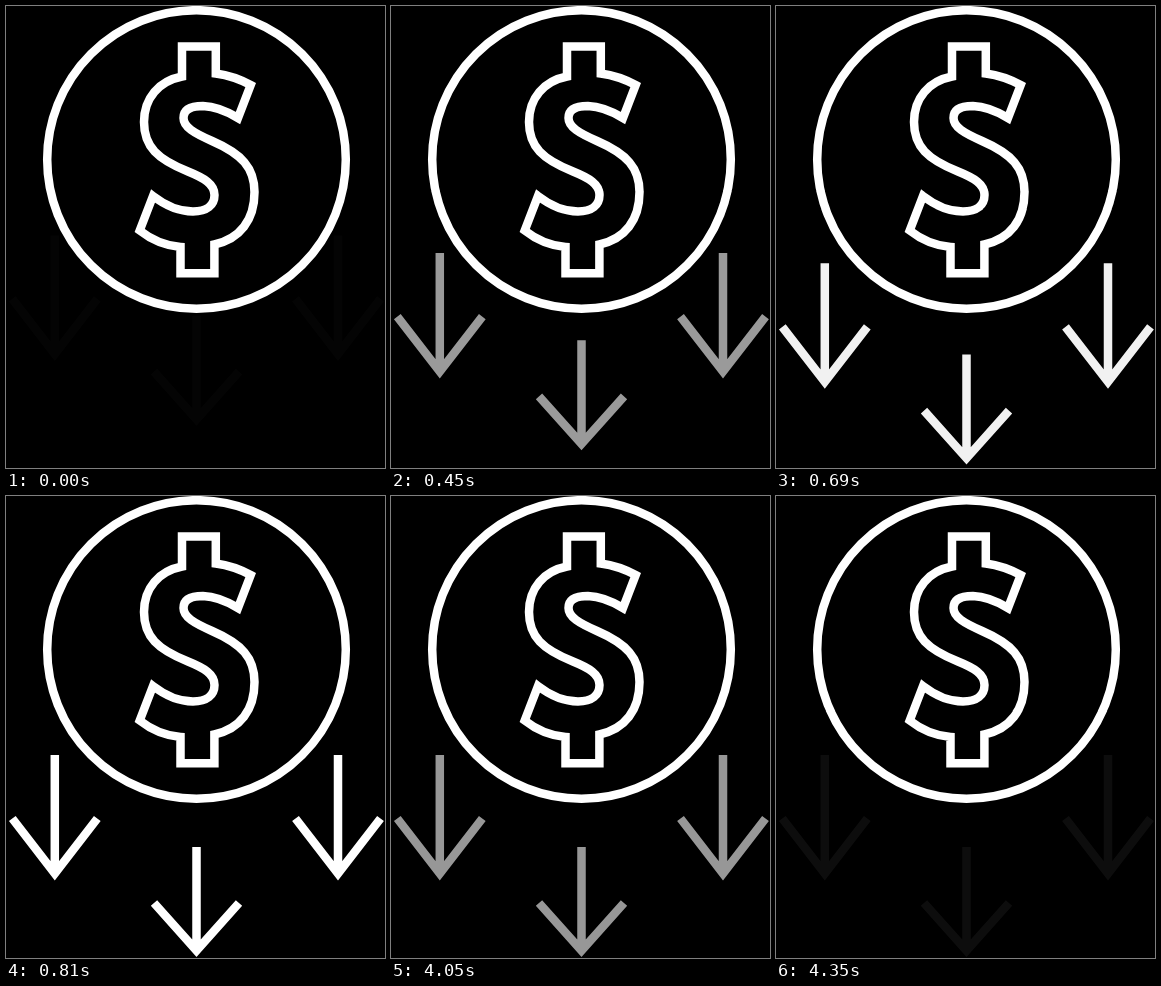
An HTML page that plays this animation: 379x462 px, repeating every 4.5 s.

```html
<!DOCTYPE html>
<html lang="en">
<head>
<meta charset="utf-8">
<title>Dollar with falling arrows</title>
<style>
  html, body { margin: 0; height: 100%; overflow: hidden; background: #000; }
  svg { display: block; width: 379px; height: 462px; }
</style>
</head>
<body>
<svg viewBox="0 0 379 462" fill="none" stroke="#fff" stroke-width="8.5" stroke-miterlimit="10">
  <g id="arrows">
    <path id="sides" d="M48.8 259V377M6.3 322.5L48.8 377.5L91.3 322.5M332 259V377M289.5 322.5L332 377.5L374.5 322.5"/>
    <path id="middle" d="M190.5 351V454M148 407L190.5 454.6L233 407"/>
  </g>
  <circle cx="190.5" cy="153.5" r="149.3"/>
  <path d="M176 40.5H209.8V67.5Q228 70 244.7 79L232 112Q213 100.5 197 100
    C184 100 177.5 104 177.5 112C177.5 121 188 127 206 135
    C236 148 248.5 162 248.5 186C248.5 214 234 233 208.4 238.5
    V267.2H174.5V241Q152 239 133.7 224.5L147 190Q167 205.5 187 205.5
    C201 205.5 208.5 199 208.5 189C208.5 178 198 172 182 165.5
    C152 153.5 138 141 138 116C138 92 153 75 176 70.5Z"/>
</svg>
<script>
  const LOOP = 4500, STEP = 30;
  const [arrows, sides, middle] = ['arrows', 'sides', 'middle'].map(id => document.getElementById(id));

  // CSS-style cubic-bezier easing, solved by bisection
  const bezier = (x1, y1, x2, y2) => x => {
    const at = (a, b, s) => 3 * (1 - s) ** 2 * s * a + 3 * (1 - s) * s * s * b + s ** 3;
    let lo = 0, hi = 1;
    for (let i = 0; i < 24; i++) {
      const mid = (lo + hi) / 2;
      if (at(x1, x2, mid) < x) lo = mid; else hi = mid;
    }
    return at(y1, y2, lo);
  };
  const enter = bezier(0.4, 0, 0.2, 1);
  const leave = bezier(0.25, 0.1, 0.25, 1);

  function draw(time) {
    const t = Math.floor((time % LOOP) / STEP) * STEP;
    const arrived = t >= 810 ? 1 : enter((Math.max(t, 210) - 150) / 760);
    const gone = t < 3960 ? 0 : leave((Math.min(t, 4350) - 3890) / 640);
    const shift = (el, distance) =>
      el.setAttribute('transform', `translate(0 ${-distance * (1 - arrived)})`);
    shift(sides, 30);
    shift(middle, 42);
    arrows.setAttribute('opacity', arrived * (1 - gone));
  }

  const start = performance.now();
  function tick() {
    draw(performance.now() - start);
    requestAnimationFrame(tick);
  }
  tick();
</script>
</body>
</html>
```
